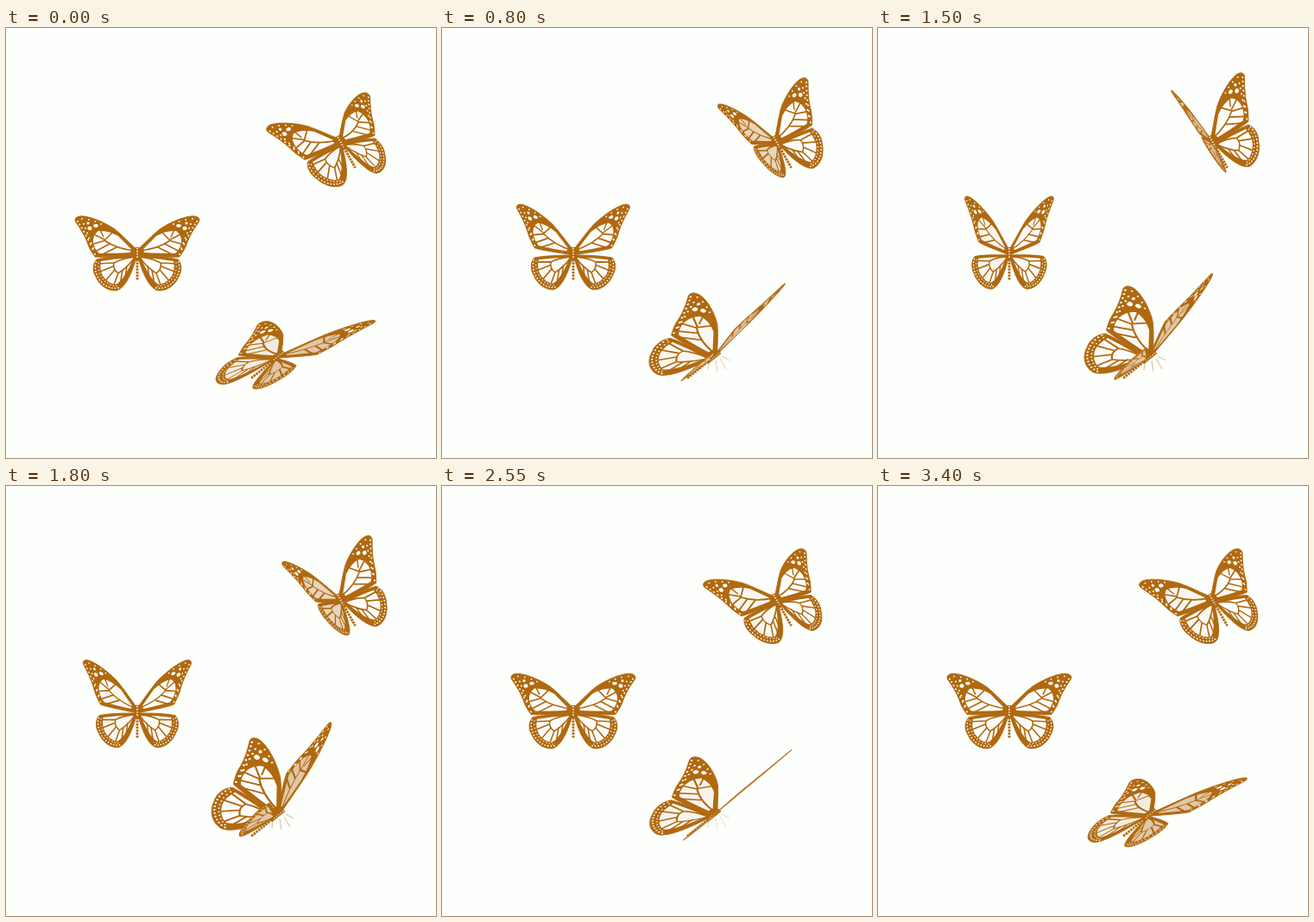
An HTML page with a canvas for the animation above (3.45 s loop, 498 by 498 pixels).

```html
<!DOCTYPE html>
<html lang="en">
<head>
<meta charset="utf-8">
<title>Butterflies</title>
<style>
html, body { margin: 0; width: 100%; height: 100%; overflow: hidden; background: #fdfffc; }
canvas { display: block; width: 498px; height: 498px; }
</style>
</head>
<body>
<canvas id="stage" width="498" height="498"></canvas>
<script>
const ctx = document.getElementById('stage').getContext('2d');
const LOOP = 3450, STEP = 50;
const BROWN = '#b06910', PAPER = '#fdfffc';

// Wing shapes: x runs outward from the body, y towards the tail.
const fore = {
  edge: new Path2D('M1-4C8-10 15-18 26-27C36-34 52-41 62-42C70-43 74-39 71-35C66-28 61-20 58-12C56-5 53-1 49 5C40 6 20 4 1 3Z'),
  cells: new Path2D('M7-4L22-19Q34-26 45-25Q52-20 51-11Q49-3 44 1Q24 1 8 0Z'),
  veins: new Path2D('M2-2Q24-4 38-14M38-14L27-25M38-15L54-23M37-14L54-9M32-10L49-1M24-6L42 3M39-18L44-28'),
  dots: new Path2D()
};
const hind = {
  edge: new Path2D('M1 3C18 4 34 5 47 8C52 13 52 22 48 28C44 38 34 45 24 44C16 42 8 30 1 6Z'),
  cells: new Path2D('M5 6Q24 7 42 10Q44 20 40 27Q34 36 25 37Q16 33 5 8Z'),
  veins: new Path2D('M3 5Q18 7 27 12Q29 19 22 24Q12 18 3 6M27 12L46 13M28 16L45 23M26 20L38 34M22 24L28 40M17 20L20 38M12 15L14 31'),
  dots: new Path2D()
};

function dot(path, x, y, rx, ry = rx) {
  path.moveTo(x + rx, y);
  path.ellipse(x, y, rx, ry, 0, 0, 7);
}

// Row of n dots along a cubic curve.
function dotRow(path, n, r, ...c) {
  for (let i = 0; i < n; i++) {
    const s = i / (n - 1), q = 1 - s;
    const at = k => q * q * q * c[k] + 3 * q * q * s * c[k + 2] + 3 * q * s * s * c[k + 4] + s * s * s * c[k + 6];
    dot(path, at(0), at(1), r);
  }
}

dotRow(fore.dots, 9, 1, 69, -36, 63, -27, 56, -14, 49, 2);
dotRow(fore.dots, 6, 1, 62, -33, 59, -25, 55, -15, 51, -5);
dotRow(fore.dots, 4, .9, 42, -33, 48, -36, 56, -39, 64, -39);
dot(fore.dots, 48, -31, 2.8, 1.9);
dot(fore.dots, 55, -28, 2.6, 2.2);
dot(fore.dots, 57, -34, 1.6);
dotRow(hind.dots, 14, .9, 48, 11, 52, 27, 38, 44, 22, 41);
dotRow(hind.dots, 11, .75, 45, 12, 47, 27, 36, 38, 24, 39);

// Each wing holds its outward vector at open, middle and closed.
const flies = [
  {
    at: [152, 260], axis: [0, 1], tint: [[0, .12], [0, .05]],
    left: { fore: [[-1, 0], [-.917, -.2], [-.68, -.36]], hind: [[-1, 0], [-.96, -.04], [-.83, -.08]] },
    right: { fore: [[1, 0], [.917, -.2], [.68, -.36]], hind: [[1, 0], [.96, -.04], [.83, -.08]] },
    keys: [[0, 0], [450, .2], [680, 1], [920, .04], [1150, .85], [1360, 1.03], [1650, .78], [1800, .63],
      [1950, .08], [2170, 1], [2550, .02], [3000, 1.02], [3050, 1], [3400, .02]]
  },
  {
    at: [387, 131], axis: [.55, .97], tint: [[.04, .9], [0, 0]],
    left: { fore: [[-.89, .34], [-.69, .014], [-.27, -.33]] },
    right: { fore: [[.76, -.23], [.79, -.456], [.8, -.577]] },
    keys: [[0, 0], [450, .5], [680, 1.04], [920, .1], [1150, .66], [1360, 1], [1650, .75], [1800, .58],
      [1950, .2], [2170, 1], [2550, .06], [3000, 1.02], [3050, 1], [3300, .35], [3400, .06]]
  },
  {
    at: [316, 380], axis: [-1, .8], tint: [[.25, 0], [.7, .7]], legs: true,
    left: { fore: [[-.85, -.1], [-.91, -.48], [-.97, -.78]] },
    right: { fore: [[1.01, -.12], [.69, -.6], [.3, -1.03]], hind: [[.6, .1], [.3, -.2], [-.05, -.4]] },
    keys: [[0, 0], [250, .45], [450, .95], [600, 1.04], [1080, 0], [1150, .12], [1700, 1.03], [1800, 1.02],
      [2225, -.02], [2550, .5], [2900, 1.04], [3050, .97], [3420, 0]]
  }
];

// Smooth cyclic curve through the keys, without overshoot.
function sample(keys, t) {
  const n = keys.length;
  const key = i => {
    const [x, y] = keys[(i + n) % n];
    return [x + Math.floor(i / n) * LOOP, y];
  };
  const slope = i => (key(i + 1)[1] - key(i)[1]) / (key(i + 1)[0] - key(i)[0]);
  const tangent = i => {
    const a = slope(i - 1), b = slope(i);
    return a * b <= 0 ? 0 : 2 * a * b / (a + b);
  };
  let i = n - 1;
  while (keys[i][0] > t) i--;
  const [x0, y0] = key(i), [x1, y1] = key(i + 1);
  const w = x1 - x0, s = (t - x0) / w, q = 1 - s;
  return y0 * (1 + 2 * s) * q * q + tangent(i) * w * s * q * q
    + y1 * s * s * (3 - 2 * s) - tangent(i + 1) * w * s * s * q;
}

const blend = ([a, b, c], p) => [0, 1].map(k =>
  a[k] * (1 - p) * (1 - 2 * p) + b[k] * 4 * p * (1 - p) + c[k] * p * (2 * p - 1));

function cellColor(k) {
  const mix = (a, b) => Math.round(a + (b - a) * Math.max(0, Math.min(1, k)));
  return `rgb(${mix(253, 211)},${mix(254, 176)},${mix(252, 132)})`;
}

function drawPart(part, [ux, uy], fly, color) {
  ctx.setTransform(ux, uy, ...fly.axis, ...fly.at);
  ctx.fillStyle = BROWN;
  ctx.fill(part.edge);
  ctx.fillStyle = color;
  ctx.fill(part.cells);
  ctx.strokeStyle = BROWN;
  ctx.lineWidth = 1.6;
  ctx.stroke(part.veins);
  ctx.fillStyle = PAPER;
  ctx.fill(part.dots);
  // Thin rim keeps the wing visible edge-on.
  ctx.setTransform(1, 0, 0, 1, 0, 0);
  const rim = new Path2D();
  rim.addPath(part.edge, new DOMMatrix([ux, uy, ...fly.axis, ...fly.at]));
  ctx.lineWidth = .9;
  ctx.stroke(rim);
}

function drawWing(fly, wing, p, [t0, t1]) {
  const color = cellColor(t0 + (t1 - t0) * p);
  drawPart(hind, blend(wing.hind || wing.fore, p), fly, color);
  drawPart(fore, blend(wing.fore, p), fly, color);
}

function line(x0, y0, x1, y1, width, color, dash = []) {
  ctx.beginPath();
  ctx.moveTo(x0, y0);
  ctx.lineTo(x1, y1);
  ctx.setLineDash(dash);
  ctx.lineWidth = width;
  ctx.strokeStyle = color;
  ctx.stroke();
  ctx.setLineDash([]);
}

function drawBody({ at: [x, y], axis: [vx, vy] }) {
  const along = (a, b, ...style) => line(x + vx * a, y + vy * a, x + vx * b, y + vy * b, ...style);
  along(-6, 9, 4.5, BROWN);
  along(-5, 7, 2, PAPER, [1.2, 2]);
  along(8, 32, 2.8, BROWN, [2.6, .9]);
}

function drawLegs([x, y], p) {
  ctx.globalAlpha = Math.max(0, Math.min(.6, p - .2));
  for (const [dx, dy, ex, ey] of [[-7, 7, -8, 16], [1, 5, 3, 18], [6, 3, 13, 15], [8, 0, 17, 5]])
    line(x + dx, y + dy, x + ex, y + ey, .8, BROWN);
  ctx.globalAlpha = 1;
}

function draw(now) {
  const t = Math.floor(now % LOOP / STEP) * STEP;
  ctx.setTransform(1, 0, 0, 1, 0, 0);
  ctx.fillStyle = PAPER;
  ctx.fillRect(0, 0, 498, 498);
  for (const fly of flies) {
    const p = sample(fly.keys, t);
    drawWing(fly, fly.left, p, fly.tint[0]);
    if (fly.legs) {
      drawLegs(fly.at, p);
      drawBody(fly);
    }
    drawWing(fly, fly.right, p, fly.tint[1]);
    if (!fly.legs) drawBody(fly);
  }
}

let start;
function tick(now) {
  start ??= now;
  draw(now - start);
  requestAnimationFrame(tick);
}
draw(0);
requestAnimationFrame(tick);
</script>
</body>
</html>
```
